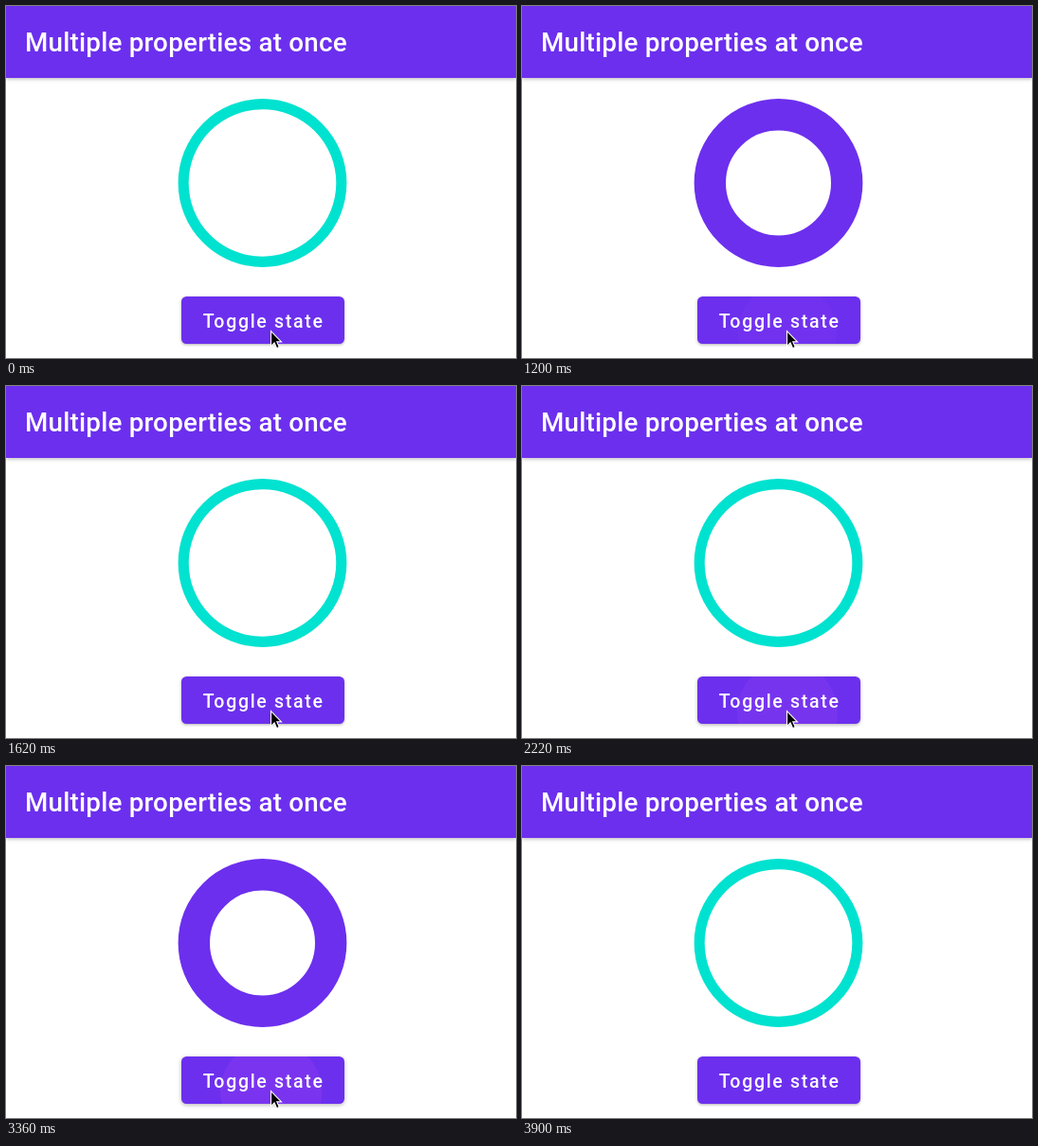
An HTML page for the animation above (4260 ms loop, 538x372 px).

```html
<!DOCTYPE html>
<html lang="en">
<head>
<meta charset="utf-8">
<title>Multiple properties at once</title>
<style>
  html, body { margin: 0; width: 100%; height: 100%; overflow: hidden; background: #fff; }
  svg { position: absolute; left: 0; top: 0; }
  text { font-family: Roboto, sans-serif; font-weight: 500; fill: #fff; }
  #bar { position: absolute; width: 538px; height: 76px; background: #6c2fee; box-shadow: 0 1px 4px rgba(0,0,0,.3); }
  #button { position: absolute; left: 185px; top: 307px; width: 172px; height: 50px; border-radius: 5.5px;
    background: #6c2fee; overflow: hidden; }
  #title { font-size: 27.8px; letter-spacing: .21px; }
  #label { font-size: 19.5px; letter-spacing: 1.7px; }
</style>
</head>
<body>
<div id="bar"></div>
<div id="button">
  <svg width="172" height="50"><circle id="ripple" fill="#be54f2"/></svg>
</div>
<svg width="538" height="372">
  <text id="title" x="20" y="48">Multiple properties at once</text>
  <circle id="ring" cx="270.5" cy="187" fill="none"/>
  <text id="label" x="207.8" y="340">Toggle state</text>
  <path id="cursor" d="M0 0V15.8L3.6 12.5 6.1 18.3 8.8 17.1 6.3 11.4H11Z" fill="#000" stroke="#fff" stroke-width="1.1"/>
</svg>
<script>
const LOOP = 4260, STEP = 60;
const PURPLE = '#6c2fee', TEAL = '#00e2d0';
const RADIUS = 88.9, THIN = 11.1, THICK = 33.4;
const clicks = [
  { press: 212, release: 332 },
  { press: 1190, release: 1408 },
  { press: 2200, release: 2345 },
  { press: 3335, release: 3480 }
];
const [button, ripple, ring, cursor] =
  ['button', 'ripple', 'ring', 'cursor'].map(id => document.getElementById(id));

const clamp = x => Math.min(1, Math.max(0, x));
const mix = (a, b, k) => a + (b - a) * k;

// y of the cubic bezier (x1, 0, x2, 1) at x
function ease(x, x1 = .4, x2 = .2) {
  let lo = 0, hi = 1;
  for (let i = 0; i < 20; i++) {
    const s = (lo + hi) / 2, r = 1 - s;
    if (3 * r * r * s * x1 + 3 * r * s * s * x2 + s ** 3 < x) lo = s; else hi = s;
  }
  return 3 * (1 - lo) * lo * lo + lo ** 3;
}

// critically damped spring, stiffness 1500
function spring(ms) {
  const x = Math.sqrt(1500) * Math.max(0, ms) / 1000;
  return 1 - (1 + x) * Math.exp(-x);
}

function draw(t) {
  let active = 0, lift = 0, alpha = 0, grow = 0;
  clicks.forEach(({ press, release }, i) => {
    active += (i % 2 ? -1 : 1) * spring(t - release);
    if (t < press) return;
    const up = ms => ease(clamp(ms / 120));
    lift = up(Math.min(t, release) - press) * (1 - ease(clamp((t - release) / 150), .4, .6));
    const fade = Math.max(press + 225, release);
    alpha = clamp((t - press) / 75) * (1 - clamp((t - fade) / 150));
    grow = ease(clamp((t - press) / 225));
  });

  const width = mix(THIN, THICK, active);
  ring.setAttribute('r', RADIUS - width / 2);
  ring.setAttribute('stroke-width', width);
  ring.style.stroke = `color-mix(in oklab, ${PURPLE} ${clamp(active) * 100}%, ${TEAL})`;

  ripple.setAttribute('cx', mix(95, 86, grow));
  ripple.setAttribute('cy', mix(38, 25, grow));
  ripple.setAttribute('r', mix(52, 103, grow));
  ripple.setAttribute('opacity', alpha * .48);
  button.style.boxShadow =
    `0 ${mix(1, 3, lift)}px ${mix(3, 12, lift)}px rgba(0,0,0,${mix(.32, .16, lift)})`;

  const leave = clamp((t - 3720) / 120);
  cursor.setAttribute('transform', `translate(${mix(279.5, 168.5, leave)} ${mix(343.5, 364.5, leave)})`);
  cursor.style.display = t < 3900 ? '' : 'none';
}

let start;
function frame(now) {
  start ??= now;
  draw(Math.floor((now - start) % LOOP / STEP) * STEP);
  requestAnimationFrame(frame);
}
draw(0);
requestAnimationFrame(frame);
</script>
</body>
</html>
```
